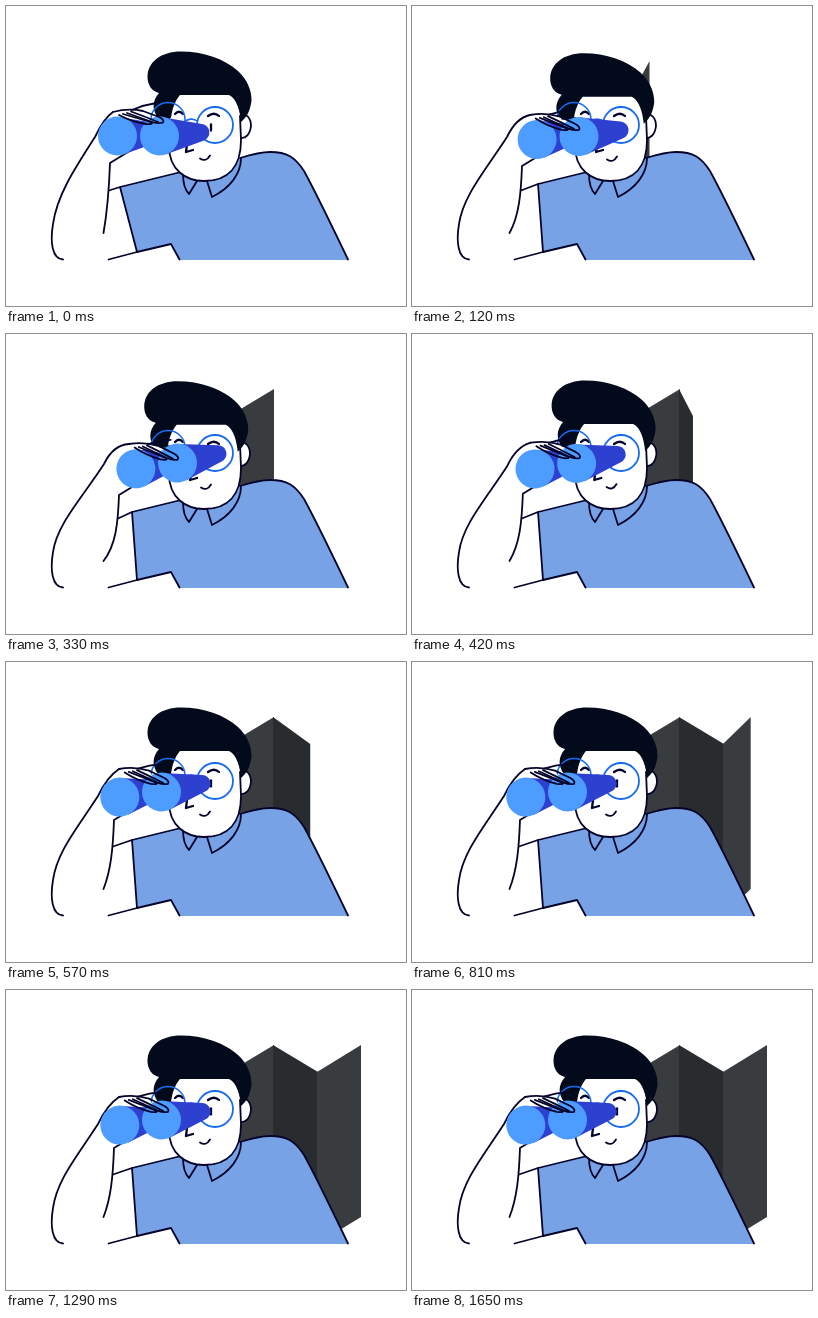
Write an HTML page that moves like this. It is 400 px wide and 300 px high and loops after 1.83 s.

```html
<!DOCTYPE html>
<html lang="en">
<head>
<meta charset="utf-8">
<title>Looking ahead</title>
<style>
  html, body { margin: 0; width: 100%; height: 100%; overflow: hidden; background: #fff; }
  svg { display: block; width: 100%; height: 100%; }
  .line { fill: none; stroke: #04042b; stroke-width: 1.8; stroke-linecap: round; stroke-linejoin: round; }
  .skin { fill: #fff; }
  .shirt { fill: #77a3e6; }
  .hair { fill: #030a1c; }
  .glasses { fill: none; stroke: #176bf0; stroke-width: 1.8; }
  .thin { stroke-width: 1.5; }
  .bold { stroke-width: 2.3; }
  .tube { fill: #2e40d0; }
  .lens { fill: #4d9cff; }
  .light { fill: #393c3f; }
  .dark { fill: #292c2e; }
</style>
</head>
<body>
<svg viewBox="0 0 400 300">
  <defs>
    <path id="barrel" class="tube" d="M3-18.8L42.5-12A8.600 8.600 0 0 1 43.900 4.700L6 18.500Z"/>
  </defs>

  <g id="wall">
    <path class="light"/>
    <path class="dark"/>
    <path class="light"/>
  </g>

  <path id="shirt" class="shirt"/>
  <path id="seam" class="line"/>
  <path class="line" d="M102.500 253.500L131 246L165 238L173.500 253.500M234 152C247 148 256 146 264 146C281 146 289 151 298 165C308 183 325 218 342 253.500"/>
  <g class="shirt">
    <path class="line" style="fill:inherit" d="M177 168C177 176 178 183 183 188L191 175M201 175L206 191C224 182 235 168 235 152"/>
  </g>

  <path id="ear" class="line" style="fill:#fff" d="M233 109C241 106 245 113 245 120C244 128 240 133 234 132"/>
  <path class="skin" d="M163 112V140C163 164 180 175 198 175C222 175 235 161 235 134L234 88H172Z"/>
  <path class="line" d="M163 112V140C163 164 180 175 198 175C222 175 235 161 235 134L234 110"/>
  <path id="hair" class="hair" d="M153 87C145 85 141.500 78 141.500 71C141.500 56 155 45.500 175 45.500C197 45.500 219 53 232 65C241 73 246 85 245.500 95C244 105 241 111 235 116C234 105 231 93 223 89H174C169 95 166 103 165 112H152C146 104 146 95 153 87Z"/>
  <path id="mouth" class="line" d="M194 152.500Q200 156.500 204 149.500"/>
  <path id="nose" class="line bold" d="M181 138L180 146L187 144"/>
  <path class="line bold" d="M202 110Q208 105.500 213 110M169 108Q173 103.500 177 108"/>
  <path class="line bold" d="M205 118.500V124.500"/>
  <circle class="glasses" cx="209" cy="119" r="18"/>
  <circle class="glasses thin" cx="162" cy="113.500" r="17"/>
  <path class="glasses thin" d="M179 115Q186 111 192 115.500"/>

  <path id="armFill" class="skin"/>
  <path id="arm" class="line"/>

  <g id="binoculars">
    <use href="#barrel" x="-42"/>
    <use href="#barrel"/>
    <circle class="lens" cx="-42" r="19.500"/>
    <circle class="lens" r="19.500"/>
  </g>
  <g id="hand">
    <path class="skin" d="M107 106Q122 102 137 105L142 112L113 109Z"/>
    <path class="line" d="M126 104Q137 99 148 97.500"/>
    <path class="line" d="M107 106Q122 102 137 105L153 111Q159 114 157 116.500Q153 118 146 116L121 107"/>
    <path class="line" d="M113 109Q126 116 140 118Q147 118.500 146 116.500L117 108M125 105.500Q140 111 152 116"/>
  </g>
</svg>

<script>
const LOOP = 1830, STEP = 30;
const el = id => document.getElementById(id);
const panels = el("wall").children;

// time; sleeve; inner elbow; wrist; knuckle; hand tilt; right lens; tilt; head turn
const poses = [
  [0,   114, 181, 104, 157,  94, 122, 107, 106, 0, 153.5, 130,   0, 0],
  [120, 126, 178, 110, 160, 100, 122, 118, 109, 5, 167,   130.5, -4, 1],
  [330, 126, 178, 113, 161, 103, 121, 123, 110, 6, 171.5, 129,   -8, 1],
  [540, 126, 178, 108, 158,  97, 125, 113, 107, 5, 155.5, 130,   -7, 0]
];

const progress = (t, from, to) => Math.min(1, Math.max(0, (t - from) / (to - from)));
const setPath = (id, d) => el(id).setAttribute("d", d);
const setMove = (id, x, y, turn = 0) =>
  el(id).setAttribute("transform", `translate(${x} ${y}) rotate(${turn})`);

function poseAt(t) {
  const next = poses.findIndex(p => p[0] > t);
  if (next < 0) return poses[poses.length - 1];
  const a = poses[next - 1], b = poses[next];
  const k = progress(t, a[0], b[0]);
  return a.map((v, i) => v + (b[i] - v) * k);
}

// Each panel unfolds from its left edge; the next one covers its last pixel.
function drawWall(t) {
  const widths = [
    45 * progress(t, 20, 330),
    45 * progress(t, 330, 620),
    43 * progress(t, 620, 915) + progress(t, 990, 1290)
  ];
  widths.forEach((w, i) => {
    const x = 223 + 44 * i;
    const [y0, y1] = i % 2 ? [55, 82] : [82, 55];
    panels[i].setAttribute("d", w ? `M${x} ${y0}L${x + w} ${y1}V${y1 + 172}L${x} ${y0 + 172}Z` : "");
  });
}

function drawFigure(t) {
  const [, sx, sy, ex, ey, wx, wy, kx, ky, handTurn, lx, ly, tilt, turn] = poseAt(t);

  setPath("shirt", `M${sx} ${sy}L175 166L234 152C247 148 256 146 264 146C281 146 289 151 298 165` +
    `C308 183 325 218 342 254H174L165 238L131 246Z`);
  setPath("seam", `M${ex - 1} 184.500L${sx} ${sy}L175 166M${sx} ${sy}L131 246`);

  const outer = `M57 253.500C46 253 44 236 47 218C51 190 ${wx - 27} ${wy + 43} ${wx - 5} ${wy + 9}` +
    `Q${wx + 4} ${wy - 10} ${kx} ${ky}`;
  const inner = `${ex} ${ey}C${ex - 1} ${ey + 28} ${ex - 3} ${ey + 50} 97.500 227`;
  setPath("armFill", `${outer}L${ex + 16} ${ey - 10}L${inner}L70 253Z`);
  setPath("arm", `${outer}M${ex + 18} ${ey - 11}L${inner}`);

  setMove("binoculars", lx, ly, tilt);
  el("hand").setAttribute("transform",
    `translate(${kx} ${ky}) rotate(${handTurn}) translate(-107 -106)`);
  setMove("hair", -3.3 * turn, 1.7 * turn);
  setMove("ear", -turn, 0);
  setMove("nose", 4 * turn, 0);
  setMove("mouth", turn, turn);
}

const start = performance.now();
function frame() {
  const now = (performance.now() - start) % LOOP;
  const t = Math.floor(now / STEP) * STEP;
  drawWall(t);
  drawFigure(t);
  requestAnimationFrame(frame);
}
frame();
</script>
</body>
</html>
```
